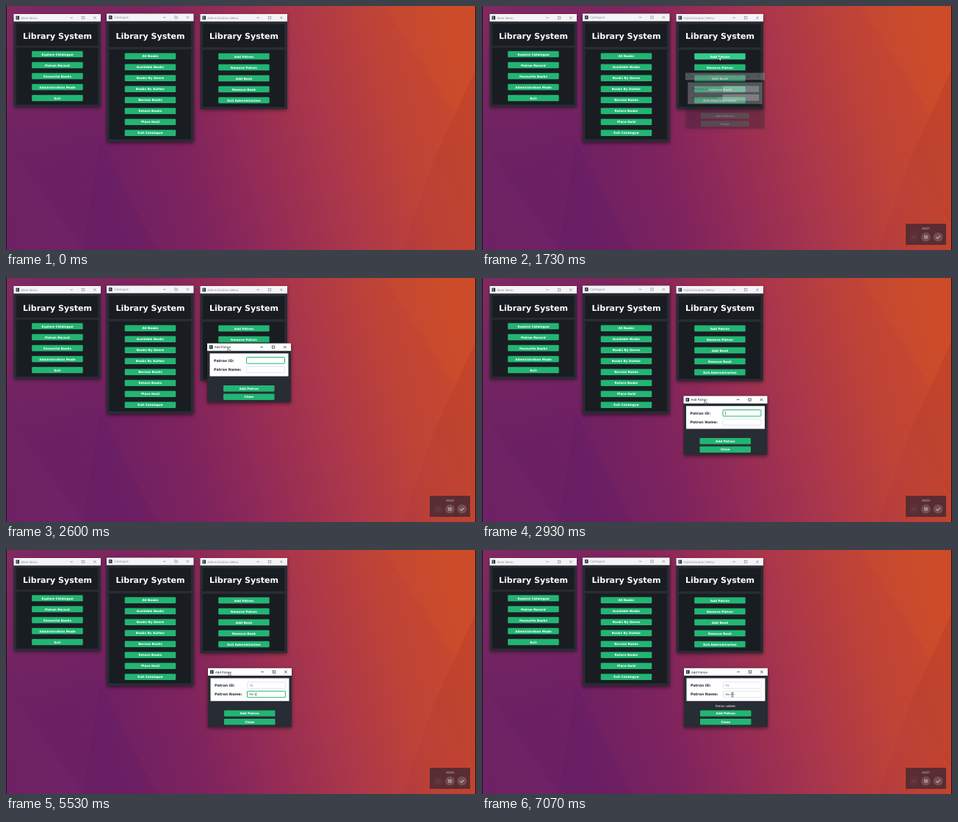
Animation, 640 px wide and 334 px high, one loop 7.14 s. Source, as an HTML page with a canvas:

```html
<!DOCTYPE html>
<html lang="en">
<head>
<meta charset="utf-8">
<title>Library System</title>
<style>
  html, body { margin: 0; width: 100%; height: 100%; overflow: hidden; background: #000; }
  canvas { display: block; width: 640px; height: 334px; }
</style>
</head>
<body>
<canvas></canvas>
<script>
const W = 640, H = 334, LOOP = 7140;
const canvas = document.querySelector('canvas');
const c = canvas.getContext('2d');
const dpr = window.devicePixelRatio || 1;
canvas.width = W * dpr;
canvas.height = H * dpr;

const BOLD = '"DejaVu Sans", sans-serif';
const UI = '"Open Sans", sans-serif';
const GREEN = '#22b573', HOVER = '#35cb8a';
const PATRON = 'Renita';

const windows = [
  { x: 10.5, y: 11, h: 127, title: 'Main Menu', first: 66, head: [24.5, 54.5], list: [57, 135],
    items: ['Explore Catalogue', 'Patron Record', 'Favourite Books', 'Administration Mode', 'Exit'] },
  { x: 137, y: 10.5, h: 175.5, title: 'Catalogue', first: 68.7, head: [24, 56], list: [59.5, 182.5],
    items: ['All Books', 'Available Books', 'Books By Genre', 'Books By Author', 'Borrow Books',
      'Return Books', 'Place Hold', 'Exit Catalogue'] },
  { x: 264.5, y: 11, h: 130, title: 'Administration Menu', first: 69, head: [25, 56.5], list: [60, 138],
    items: ['Add Patron', 'Remove Patron', 'Add Book', 'Remove Book', 'Exit Administration'] }
];

// [time, x, y] points
const pointerPath = [[70, 58, 92], [500, 92, 108], [800, 140, 100], [1130, 222.5, 83], [1330, 240, 80],
  [1600, 323, 69.5], [1950, 323, 69.5], [2400, 302, 95.5], [2600, 302, 95.5], [2930, 303, 167.5],
  [5950, 303, 167.5], [6350, 335, 222], [6700, 335, 222], [6980, 341, 198], [7140, 341, 198]];
const dialogPath = [[2600, 274, 89.5], [2930, 274.5, 161.5], [3050, 275, 161.8]];

const clamp = v => Math.max(0, Math.min(1, v));
const ease = v => v * v * (3 - 2 * v);

function along(path, t) {
  let i = 0;
  while (i < path.length - 2 && t > path[i + 1][0]) i++;
  const [t0, x0, y0] = path[i], [t1, x1, y1] = path[i + 1];
  const k = ease(clamp((t - t0) / (t1 - t0)));
  return [x0 + (x1 - x0) * k, y0 + (y1 - y0) * k];
}

function rect(x, y, w, h, fill, r = 0) {
  c.fillStyle = fill;
  c.beginPath();
  c.roundRect(x, y, w, h, r);
  c.fill();
}

function poly(points, fill) {
  c.beginPath();
  for (let i = 0; i < points.length; i += 2) c.lineTo(points[i], points[i + 1]);
  c.closePath();
  c.fillStyle = fill;
  c.fill();
}

function lines(color, width, ...paths) {
  c.strokeStyle = color;
  c.lineWidth = width;
  c.beginPath();
  for (const [x, y, ...rest] of paths) {
    c.moveTo(x, y);
    for (let i = 0; i < rest.length; i += 2) c.lineTo(rest[i], rest[i + 1]);
  }
  c.stroke();
}

function text(s, x, y, size, fill, family = UI, weight = 400, align = 'left') {
  c.font = `${weight} ${size}px ${family}`;
  c.textAlign = align;
  c.fillStyle = fill;
  c.fillText(s, x, y);
}

function wallpaper() {
  const g = c.createLinearGradient(0, 250, 620, 90);
  [[0, '#6b2163'], [.2, '#6d2064'], [.38, '#7d235e'], [.55, '#972d55'], [.7, '#ac3849'],
    [.85, '#bf4337'], [1, '#c9492b']].forEach(s => g.addColorStop(...s));
  c.fillStyle = g;
  c.fillRect(0, 0, W, H);
  const glow = c.createRadialGradient(0, 0, 0, 0, 0, 230);
  glow.addColorStop(0, 'rgba(150,55,90,.45)');
  glow.addColorStop(1, 'rgba(150,55,90,0)');
  c.fillStyle = glow;
  c.fillRect(0, 0, W, H);
  poly([515, 0, 640, 0, 640, 85, 612, 150], 'rgba(225,95,30,.1)');
  poly([640, 85, 583, 210, 640, 300], 'rgba(120,25,40,.09)');
  poly([583, 210, 540, 334, 640, 334, 640, 300], 'rgba(120,25,50,.06)');
  poly([0, 185, 0, 334, 105, 334], 'rgba(130,45,105,.14)');
  poly([128, 186, 105, 334, 205, 334], 'rgba(70,15,95,.1)');
  rect(0, 0, 1, H, '#1c0a1c');
  rect(639, 0, 1, H, '#1c0a14');
}

function frame(x, y, w, h, title, active) {
  c.save();
  c.shadowColor = 'rgba(0,0,0,.5)';
  c.shadowBlur = 5 * dpr;
  c.shadowOffsetY = 1.5 * dpr;
  rect(x, y, w, h, '#282c34');
  c.restore();
  rect(x, y, w, 10.3, active ? '#fff' : '#f4f3f5');
  rect(x + 3, y + 2.6, 4.6, 5, '#25313a');
  rect(x + 4.3, y + 3.6, 1.2, 3, '#aebcc2');
  text(title, x + 10, y + 6.7, 4.25, active ? '#111' : '#8a8a8e');
  const ink = active ? '#222' : '#88888c', r = x + w, m = y + 5.1;
  lines(ink, .7, [r - 41.8, m, r - 38], [r - 41.8, m, r - 38, m],
    [r - 25.6, m - 1.6, r - 22.2, m - 1.6, r - 22.2, m + 1.6, r - 25.6, m + 1.6, r - 25.6, m - 1.9],
    [r - 9.8, m - 1.7, r - 6.4, m + 1.7], [r - 9.8, m + 1.7, r - 6.4, m - 1.7]);
}

function button(label, x, cy, pointer) {
  const over = pointer && pointer[0] >= x && pointer[0] <= x + 69.5 && Math.abs(pointer[1] - cy) < 4.3;
  rect(x, cy - 4.2, 69.5, 8.4, over ? HOVER : GREEN, 1);
  text(label, x + 34.75, cy + 1.5, 4.2, '#fff', BOLD, 700, 'center');
}

function menu(win, pointer) {
  const { x, y, h, head, list } = win;
  frame(x, y, 118.5, h, win.title, false);
  for (const [top, bottom] of [head, list]) rect(x + 3.5, top, 111.5, bottom - top, '#191d22');
  text('Library System', x + 59.5, y + 34, 11.05, '#fff', BOLD, 700, 'center');
  win.items.forEach((label, i) => button(label, x + 24.7, win.first + i * 15, pointer));
}

function field(label, value, x, y, focused, caret) {
  text(label, x + 9, y + 6.2, 4.85, '#24282e', BOLD, 700);
  rect(x + 53.5, y, 52, 8.6, '#fff', .8);
  c.strokeStyle = focused ? GREEN : '#cfd3d8';
  c.lineWidth = focused ? 1 : .6;
  c.stroke();
  text(value, x + 56.5, y + 5.8, 4.1, '#4a4d52');
  if (focused && caret) rect(x + 56.8 + c.measureText(value).width, y + 1.9, .5, 5, '#222');
}

function dialog(t, pointer) {
  const k = clamp((t - 1685) / 190);
  if (!k) return;
  const [x, y] = along(dialogPath, t);
  const scale = .94 + .06 * ease(k);
  c.save();
  c.globalAlpha = k < 1 ? k : 1;
  c.translate(x + 57, y + 40.3);
  c.scale(scale, scale);
  c.translate(-x - 57, -y - 40.3);
  frame(x, y, 114, 80.5, 'Add Patron', true);
  rect(x + 3.5, y + 13.7, 107, 31.3, '#fff');
  const focus = t < 4750 ? 0 : t < 6480 ? 1 : 2;
  const caret = t > 4950 && t < 5900 || t % 1060 > 500;
  const id = '15'.slice(0, t < 3950 ? 0 : t < 4250 ? 1 : 2);
  const name = PATRON.slice(0, Math.max(0, Math.floor((t - 4890) / 150)));
  field('Patron ID:', id, x, y + 19, focus === 0, caret);
  field('Patron Name:', name, x, y + 31.4, focus === 1, caret);
  if (t > 6480) text('Patron added.', x + 57, y + 53, 4, '#fff', BOLD, 400, 'center');
  button('Add Patron', x + 22, y + 61.8, t > 1900 && pointer);
  button('Close', x + 22, y + 73.3, t > 1900 && pointer);
  c.restore();
}

function disc(x, y, fill) {
  c.beginPath();
  c.arc(x, y, 6.3, 0, 7);
  c.fillStyle = fill;
  c.fill();
}

function recorder(t) {
  rect(577, 298, 55, 29, 'rgba(72,42,50,.85)');
  rect(577, 296.8, Math.min(55, t * .0081), 1.3, '#d83a2a');
  const s = Math.floor((t + 100) / 1000);
  text('00:0' + s, 604.5, 305.9, 4.2, '#ddd0d2', UI, 400, 'center');
  disc(588, 316.3, 'rgba(255,255,255,.03)');
  disc(604.5, 316.3, 'rgba(255,255,255,.16)');
  disc(621, 316.3, 'rgba(255,255,255,.16)');
  lines('#74555b', .7, [586, 314.3, 590, 318.3], [586, 318.3, 590, 314.3]);
  lines('#f0e8e8', 1, [603.2, 314, 603.2, 318.6], [605.8, 314, 605.8, 318.6],
    [618.4, 316.4, 620.3, 318.3, 623.8, 314.5]);
}

function drawPointer(x, y, beam) {
  if (beam) {
    lines('#222', .6, [x - 1.5, y - 2.8, x + 1.5, y - 2.8], [x, y - 2.8, x, y + 2.8],
      [x - 1.5, y + 2.8, x + 1.5, y + 2.8]);
    return;
  }
  poly([x, y, x, y + 5, x + 1.2, y + 4, x + 2, y + 5.8, x + 2.9, y + 5.4, x + 2.1, y + 3.7, x + 3.7, y + 3.6], '#fff');
  c.strokeStyle = '#111';
  c.lineWidth = .5;
  c.stroke();
}

function draw(t) {
  c.setTransform(dpr, 0, 0, dpr, 0, 0);
  c.textRendering = 'geometricPrecision';
  const pointer = t < 70 ? null : along(pointerPath, t);
  wallpaper();
  windows.forEach(w => menu(w, t < 2000 && pointer));
  dialog(t, pointer);
  if (!pointer) return;
  recorder(t);
  const [x, y] = pointer;
  drawPointer(x, y, t > 6700 && y > 193 && y < 202);
}

const start = performance.now();
function tick() {
  draw((performance.now() - start) % LOOP);
  requestAnimationFrame(tick);
}
tick();
</script>
</body>
</html>
```
